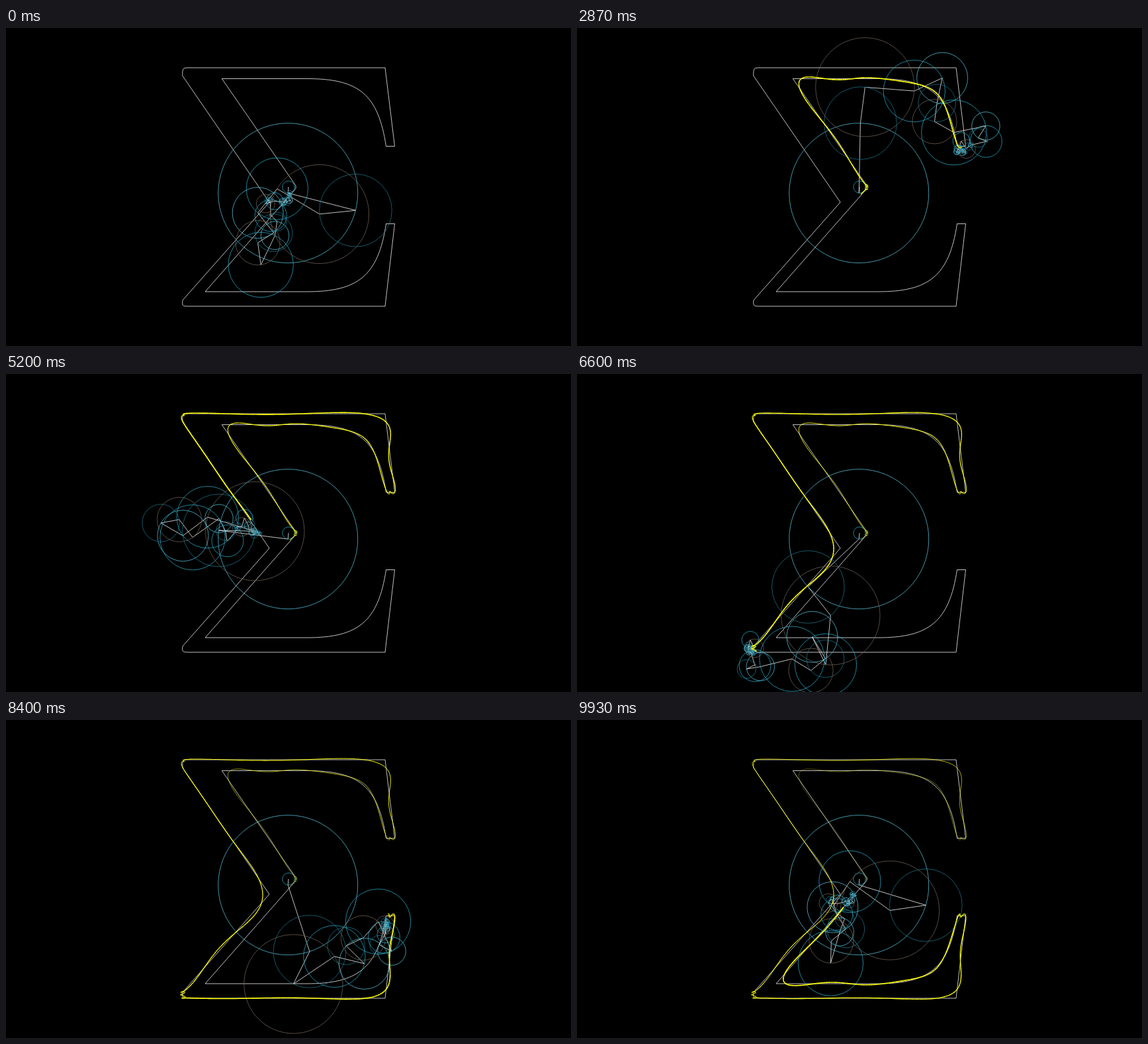
An HTML page with a canvas that plays this animation: 854x480 px, repeating every 9990 ms.

```html
<!DOCTYPE html>
<html lang="en">
<head>
<meta charset="utf-8">
<title>Fourier epicycles drawing a Sigma</title>
<style>
html, body { margin: 0; width: 100%; height: 100%; overflow: hidden; background: #000; }
canvas { display: block; width: 854px; height: 480px; }
</style>
</head>
<body>
<canvas id="stage" width="854" height="480"></canvas>
<script>
const ctx = document.getElementById('stage').getContext('2d');
const TAU = 2 * Math.PI;
const STEPS = 150, LOOP = 9990;
const MAX_FREQ = 25;
const CENTER = [427, 240];
const COLORS = ['#29abca', '#58c4dd', '#1c758a', '#736357'];
const THIN = 0.75, TRACE = 1.8;

// Outline of the letter: two numbers make a line, six make a cubic curve.
const start = [435, 246];
const outline = [
  [437.4, 243.4, 438.2, 241.6, 438.2, 240],
  [438.2, 238.4, 437.3, 236.8, 436, 235],
  [326.3, 76.5],
  [455, 76.5],
  [534, 76.5, 562.5, 100.5, 574.5, 178.5],
  [587.5, 178.5],
  [573, 60],
  [276, 60],
  [267.5, 60, 266.7, 61, 266.7, 72],
  [398, 263],
  [269.5, 408],
  [267, 410.8, 266.7, 411.3, 266.7, 414],
  [266.7, 419.5, 267.7, 420, 276, 420],
  [573, 420],
  [587.5, 295.5],
  [574.5, 295.5],
  [562.5, 375, 531, 398, 455, 398],
  [301, 398],
  start
];

function pointOn(p, seg, u) {
  const v = 1 - u;
  return [0, 1].map(i => seg.length === 2
    ? v * p[i] + u * seg[i]
    : v * v * v * p[i] + 3 * v * v * u * seg[i] + 3 * v * u * u * seg[i + 2] + u * u * u * seg[i + 4]);
}

// Every segment takes the same share of the cycle.
function samplePath(perSegment) {
  const points = [];
  let from = start;
  for (const seg of outline) {
    for (let j = 0; j < perSegment; j++) points.push(pointOn(from, seg, (j + 0.5) / perSegment));
    from = seg.slice(-2);
  }
  return points;
}

// Positive frequencies turn counter-clockwise on screen.
function coefficient(freq, points) {
  let x = 0, y = 0;
  points.forEach((p, i) => {
    const a = TAU * freq * (i + 0.5) / points.length;
    const px = p[0] - CENTER[0], py = p[1] - CENTER[1];
    x += px * Math.cos(a) - py * Math.sin(a);
    y += px * Math.sin(a) + py * Math.cos(a);
  });
  x /= points.length;
  y /= points.length;
  return { freq, radius: Math.hypot(x, y), phase: Math.atan2(y, x) };
}

const samples = samplePath(160);
const arms = [coefficient(0, samples)];
for (let f = 1; f <= MAX_FREQ; f++) arms.push(coefficient(f, samples), coefficient(-f, samples));

function joints(t) {
  let [x, y] = CENTER;
  const list = [[x, y]];
  for (const arm of arms) {
    const a = arm.phase - TAU * arm.freq * t;
    x += arm.radius * Math.cos(a);
    y += arm.radius * Math.sin(a);
    list.push([x, y]);
  }
  return list;
}

const TRACE_PARTS = 760;
const trace = Array.from({ length: TRACE_PARTS + 1 }, (_, i) => joints(i / TRACE_PARTS).pop());

const letter = new Path2D();
letter.moveTo(...start);
for (const seg of outline) {
  if (seg.length === 2) letter.lineTo(...seg);
  else letter.bezierCurveTo(...seg);
}
letter.closePath();

function drawTrace(head) {
  ctx.strokeStyle = '#ffff00';
  for (let i = 0; i < TRACE_PARTS; i++) {
    const age = head - i / TRACE_PARTS;
    if (age <= 0) break;
    ctx.lineWidth = TRACE * (1 - age);
    ctx.beginPath();
    ctx.moveTo(...trace[i]);
    ctx.lineTo(...trace[i + 1]);
    ctx.stroke();
  }
}

function draw(step) {
  const pts = joints(step / STEPS);
  ctx.fillStyle = '#000';
  ctx.fillRect(0, 0, 854, 480);
  ctx.lineWidth = THIN;
  ctx.strokeStyle = '#fff';
  ctx.stroke(letter);

  ctx.beginPath();
  pts.forEach(p => ctx.lineTo(...p));
  ctx.stroke();

  arms.forEach((arm, i) => {
    ctx.strokeStyle = COLORS[i % COLORS.length];
    ctx.beginPath();
    ctx.arc(...pts[i], arm.radius, 0, TAU);
    ctx.stroke();
  });

  // The trace trails the tip by one step.
  drawTrace((step - 1) / STEPS);
}

// Steps run at 15 per second, with start times rounded to 10 ms.
function stepAt(ms) {
  const k = Math.min(STEPS - 1, Math.floor(ms * 0.015 + 0.1));
  return Math.round(k * 20 / 3) * 10 > ms ? k - 1 : k;
}

let shown = -1;
function tick() {
  const step = stepAt(performance.now() % LOOP);
  if (step !== shown) draw(shown = step);
  requestAnimationFrame(tick);
}
tick();
</script>
</body>
</html>
```
